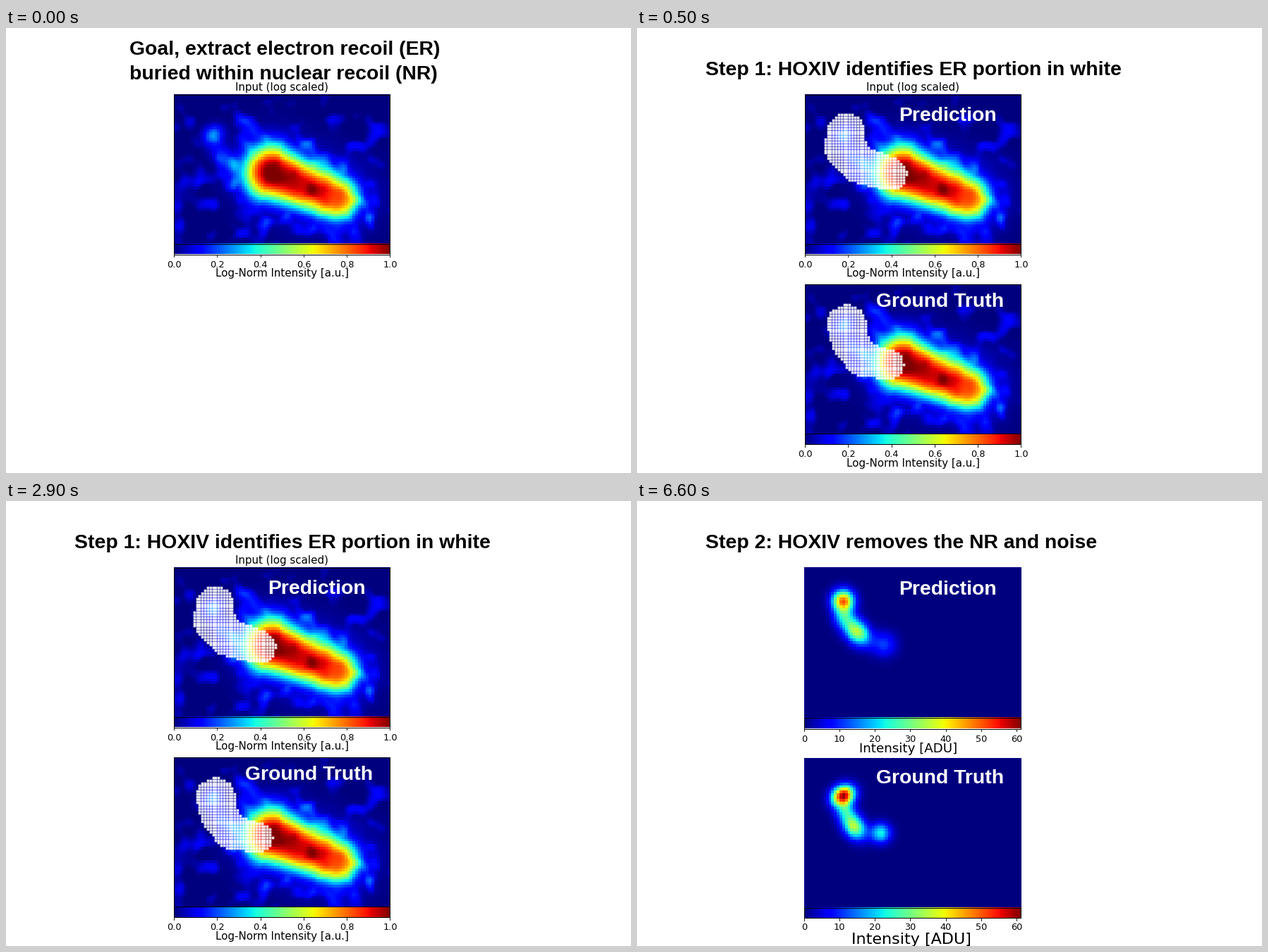
A matplotlib script for the animation above (8000 ms loop, 886 px wide and 632 px high).

```python
import numpy as np
import matplotlib.pyplot as plt
from matplotlib.animation import FuncAnimation
from matplotlib.patches import Rectangle

W, H, DPI = 886, 632, 64
NX, NY = 80, 55
BOX = (238, 544.5, 94.5, 306.5)    # left, right, top, bottom of the upper panel
STEP = 269.5                       # vertical distance between panels
SANS, BOLD = "DejaVu Sans", "Liberation Sans"

fig = plt.figure(figsize=(W / DPI, H / DPI), dpi=DPI, facecolor="white")
ax = fig.add_axes([0, 0, 1, 1])
ax.axis("off")

gx = BOX[0] + (np.arange(NX) + 0.5) * (BOX[1] - BOX[0]) / NX
gy = BOX[2] + (np.arange(NY) + 0.5) * (BOX[3] - BOX[2]) / NY
X, Y = np.meshgrid(gx, gy)


def px(size):
    return size * 72 / DPI


def gauss(x, y, amp, s, across=None, angle=0):
    """Tilted Gaussian spot; s runs along the angle."""
    c, n = np.cos(np.radians(angle)), np.sin(np.radians(angle))
    u = (X - x) * c + (Y - y) * n
    v = (Y - y) * c - (X - x) * n
    return amp * np.exp(-(u / s) ** 2 / 2 - (v / (across or s)) ** 2 / 2)


def along(x0, y0, x1, y1):
    """Position along a segment (0..1) and distance to it."""
    dx, dy = x1 - x0, y1 - y0
    t = np.clip(((X - x0) * dx + (Y - y0) * dy) / (dx * dx + dy * dy), 0, 1)
    return t, np.hypot(X - x0 - t * dx, Y - y0 - t * dy)


def smooth_noise(seed, s):
    k = np.exp(-(np.arange(-8, 9) / s) ** 2 / 2)
    a = np.random.default_rng(seed).normal(size=(NY, NX))
    for axis in (0, 1):
        a = np.apply_along_axis(np.convolve, axis, a, k, "same")
    return a / a.std()


def recoil_field():
    t, d = along(377, 206, 468, 242)
    core = (1 - 0.18 * t) * np.exp(-(d / (40 - 9 * np.sqrt(t))) ** 2.6)

    noise = smooth_noise(7, 1.6)
    near = np.exp(-(d / 110) ** 2)
    bg = 0.055 * np.maximum(noise, 0) * (0.6 + 0.7 * near)
    bg += (0.2 + 0.03 * noise) * np.exp(-(d / 48) ** 2)
    bg += gauss(294, 152, 0.26, 10, 8.5, -35)
    bg += gauss(311, 188, 0.18, 20, 9, 52)
    return np.clip(np.hypot(core, np.maximum(bg, 0)), 0, 1)


def tube(points):
    """Cells within a path whose radius varies from point to point."""
    inside = np.zeros(X.shape, bool)
    for (x0, y0, r0), (x1, y1, r1) in zip(points, points[1:]):
        t, d = along(x0, y0, x1, y1)
        inside |= d <= r0 + (r1 - r0) * t
    return inside


def label(x, y, s, size, ha="center", font=SANS, color="black"):
    weight = "bold" if font == BOLD else "normal"
    return ax.text(x, y, s, fontsize=px(size), ha=ha, va="baseline",
                   family=font, weight=weight, color=color)


def heading(x, y, s, color="black"):
    return label(x, y, s, 28.4, "left", BOLD, color)


def frame(l, r, t, b):
    return ax.add_patch(Rectangle((l, t), r - l, b - t, fill=False,
                                  ec="black", lw=px(1), zorder=3))


def heatmap(data, l, r, t, b):
    return ax.imshow(data, cmap="jet", vmin=0, vmax=1, aspect="auto",
                     extent=(l, r, b, t), interpolation="nearest", zorder=1)


def colorbar(l, r, t, b, ticks, top, fmt, base):
    out = [heatmap(np.linspace(0, 1, 256)[None], l, r, t, b), frame(l, r, t, b)]
    for v in ticks:
        x = l + (r - l) * v / top
        out += ax.plot([x, x], [b, b + 3.5], color="black", lw=px(0.9))
        out.append(label(x, base, fmt % v, 12.9))
    return out


def input_panel(data, dy):
    l, r, t, b = BOX
    t, b = t + dy, b + dy
    out = [heatmap(data, l, r, t, b), frame(l, r, t, b)]
    out += colorbar(l, r, b, b + 15, np.arange(6) / 5, 1, "%.1f", b + 33)
    out.append(label(391.3, b + 46.5, "Log-Norm Intensity [a.u.]", 15.15))
    return out


def result_panel(data, t, b, foot, tick_base, name_x, name_base, size):
    out = [heatmap(data, 237, 545, t, b)]
    out += colorbar(237, 544.5, b, foot, range(0, 61, 10), 61.3, "%d", tick_base)
    out.append(label(name_x, name_base, "Intensity [ADU]", size))
    return out


def overlay(mask, dy):
    dots = ax.scatter(X[mask], Y[mask] + dy, s=px(3.6) ** 2, marker="s",
                      color="white", alpha=0.9, linewidths=0, zorder=2)
    dots.set_snap(False)
    return dots


def captions(title, y1, y2):
    return [heading(97, 67, title),
            heading(371, y1, "Prediction", "white"),
            heading(339, y2, "Ground Truth", "white")]


field = recoil_field()
guess = tube([(296, 149, 28), (294, 168, 29), (312, 192, 27), (358, 207, 24)])
truth = tube([(297, 151, 28), (301, 176, 26), (320, 201, 25), (357, 208, 21)])

# Two charge clusters joined by a faint neck, then a weak end spot.
kept_guess = (gauss(293, 142, 0.8, 10.5) + gauss(312, 185, 0.58, 15, 10.5, 45)
              + gauss(294, 164, 0.26, 10) + gauss(351, 203, 0.18, 12))
kept_truth = (gauss(293, 148, 0.97, 11.5, 9.5, -35) + gauss(308, 191, 0.58, 14, 10, 55)
              + gauss(296, 169, 0.24, 9) + gauss(346, 201, 0.37, 10))

top_panel = input_panel(field, 0) + [label(391.3, 89, "Input (log scaled)", 15.15)]

intro = top_panel + [
    heading(175, 38, "Goal, extract electron recoil (ER)"),
    heading(175, 73, "buried within nuclear recoil (NR)"),
]

identify = (top_panel + input_panel(field, STEP)
            + [overlay(guess, 0), overlay(truth, STEP)]
            + captions("Step 1: HOXIV identifies ER portion in white", 132, 395.5))

remove = (result_panel(kept_guess, 94, 308, 323.5, 341.5, 385, 357, 18.3)
          + result_panel(kept_truth, 366, 577.5, 592, 609, 388.5, 629, 22.2)
          + captions("Step 2: HOXIV removes the NR and noise", 133, 401))

everything = list(dict.fromkeys(intro + identify + remove))

ax.set_xlim(0, W)
ax.set_ylim(H, 0)


def draw(i):
    scene = intro if i < 1 else identify if i < 9 else remove
    for artist in everything:
        artist.set_visible(artist in scene)
    return everything


anim = FuncAnimation(fig, draw, frames=16, interval=500, init_func=lambda: draw(0),
                     repeat=True, repeat_delay=0, blit=False)
plt.show()
```
